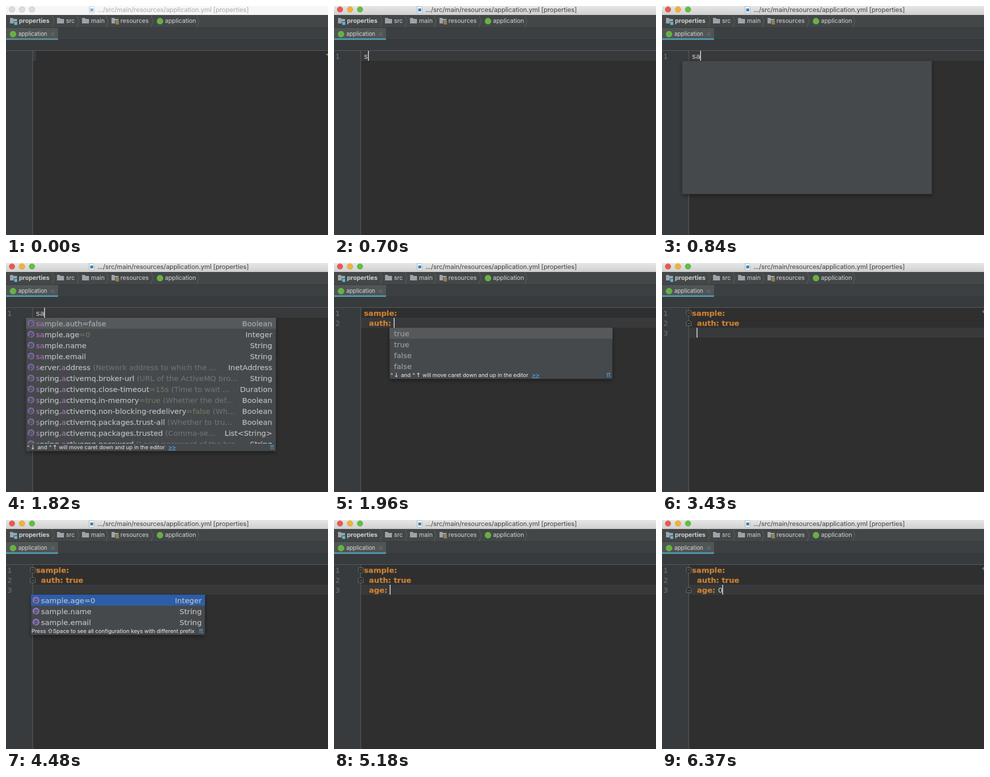
These frames come from a looping animation (644 px wide and 460 px high, 6.44 s). An HTML page:

```html
<!DOCTYPE html>
<html lang="en">
<head>
<meta charset="utf-8">
<title>Editor completion</title>
<style>
  html, body { margin: 0; width: 100%; height: 100%; overflow: hidden; background: #2f2f2f; }
  svg { display: block; width: 644px; height: 460px; }
  text, tspan { white-space: pre; fill: currentColor; stroke: currentColor; stroke-width: .25px; }
  .ui { font-family: Inter, Roboto, sans-serif; color: #c6c9cb; stroke-width: .15px; }
  .code { font: 14.88px "DejaVu Sans", sans-serif; color: #b9bbbc; }
  .key { font-weight: bold; color: #cc8134; }
  .num { color: #686c6f; }
  .hit { color: #a670b1; }
  .value { color: #687a5c; }
  .desc { color: #6c7072; }
  .faint { color: #999c9e; }
  .dim { color: #a6a8a9; }
  .hint { color: #d6d8d9; }
  .link { color: #599be4; }
</style>
</head>
<body>
<svg id="stage" viewBox="0 0 644 460"></svg>
<script>
const LOOP = 6440;

const rect = (x, y, w, h, fill, more = '') =>
  `<rect x="${x}" y="${y}" width="${w}" height="${h}" fill="${fill}" ${more}/>`;
const circle = (x, y, r, fill, more = '') =>
  `<circle cx="${x}" cy="${y}" r="${r}" fill="${fill}" ${more}/>`;
const line = (d, color, width = 1) =>
  `<path d="${d}" fill="none" stroke="${color}" stroke-width="${width}"/>`;
const text = (x, y, body, cls, more = '') =>
  `<text x="${x}" y="${y}" class="${cls}" ${more}>${body}</text>`;
const ui = (x, y, body, size, more = '') => text(x, y, body, 'ui', `font-size="${size}" ${more}`);
const hint = (x, y, body) => text(x, y, body, 'ui hint', 'font-size="10.9"');
const span = (cls, body) => `<tspan class="${cls}">${body}</tspan>`;
const group = (id, body) => `<g id="${id}">${body}</g>`;

const folder = x =>
  `<path d="M${x} 24h5.5l1.5 2h7v9h-14z" fill="#9ba4aa"/>`;
const chevron = x => line(`M${x} 19l4 11.5l-4 12`, '#5f6467');

function fold(y, dir) {
  const at = n => y + n * dir;
  return `<path d="M48.5 ${at(-5)}h10V${at(2.5)}L55.5 ${at(5.5)}h-4L48.5 ${at(2.5)}z" fill="#2f2f2f" stroke="#717476"/>`
    + line(`M51 ${at(-.5)}h5`, '#717476');
}

function titleBar(active) {
  const lights = active ? ['#ee574f', '#f3b232', '#5bc140'] : ['#dcdcdc', '#dcdcdc', '#dcdcdc'];
  const rim = 'stroke="#000" stroke-opacity=".14"';
  return rect(0, 0, 644, 18, active ? 'url(#bar)' : '#f6f6f6')
    + lights.map((c, i) => circle(12 + 20 * i, 7, 5.8, c, rim)).join('')
    + `<g opacity="${active ? 1 : .6}">`
    + '<path d="M166.5 .5h7l3 3v10.500h-10z" fill="#fcfcfc" stroke="#a3a8ac"/>'
    + rect(168.500, 5, 6, 6, '#3283bd') + '</g>'
    + ui(183, 12, '.../src/main/resources/application.yml [properties]', 12.75,
         `style="color:${active ? '#505050' : '#b2b2b2'}"`);
}

function chrome() {
  return rect(0, 18, 644, 26, '#434748') + rect(0, 43, 644, 1, '#333637')
    + folder(8) + rect(15.5, 31, 7, 7, '#434748') + rect(16.5, 32, 6, 6, '#58b8d8')
    + ui(26, 34, 'properties', 12, 'font-weight="700"') + chevron(92)
    + folder(102) + ui(120, 34, 'src', 12) + chevron(142)
    + folder(152) + ui(170, 34, 'main', 12) + chevron(200)
    + folder(211) + rect(218, 29, 9, 9, '#434748')
    + [30, 32.5, 35].map(y => rect(219, y, 7, 1.5, '#c9a452')).join('')
    + ui(229, 34, 'resources', 12) + chevron(290)
    + circle(308, 30.5, 6.5, '#67b045') + ui(318, 34, 'application', 12) + chevron(382)
    + rect(0, 44, 644, 24, '#3d4042') + rect(0, 44, 104, 24, '#505556')
    + circle(14, 56.5, 6.5, '#67b045') + ui(24.8, 60, 'application', 11.15)
    + line('M89.500 53l7 7m0 -7l-7 7', '#7d8284')
    + rect(0, 67, 644, 1, '#323536') + rect(0, 65, 104, 3, '#4f9fb1')
    + rect(0, 68, 644, 21, '#383b3d') + rect(0, 89, 644, 1, '#5c6062');
}

const badge = (x, y, fill) => circle(x, y, 7, fill)
  + text(x, y + 3.5, 'p', 'ui', 'font-size="11" text-anchor="middle" style="color:#353044"');

function popup(id, x, y, w, h, rows, selected, footer) {
  return group(id,
    rect(x, y, w, h, '#45494b', 'filter="url(#shadow)"')
    + rect(x + .5, y + .5, w - 1, h - 1, 'none', 'stroke="#3b3e40"')
    + group(id + 'Body', rect(x, y, w, 22, selected) + rows + footer));
}

const arrow = (x, y, glyph) => hint(x, y, '^')
  + text(x + 7, y, glyph, 'code hint', 'style="font-size:11.5px"');
const pi = (x, y) => text(x, y, 'π', 'code', 'text-anchor="middle" style="color:#4d9bd0;font-size:13.5px"');

function caretHint(x, y, piX) {
  return arrow(x, y, '↓') + hint(x + 21, y, 'and') + arrow(x + 44, y, '↑')
    + hint(x + 64, y, 'will move caret down and up in the editor')
    + text(x + 283, y, '&gt;&gt;', 'ui link', 'font-size="11" font-weight="600" text-decoration="underline"')
    + pi(piX, y);
}

function entry(x, y, right, body, type, purple, cls = '') {
  return badge(x - 10, y - 6, purple) + text(x, y, body, 'code ' + cls)
    + text(right, y, type, 'code ' + cls, 'text-anchor="end"');
}

function propertyRows() {
  const sample = rest => span('hit', 'sa') + 'mple.' + rest;
  const mq = (rest, value, desc) => span('hit', 's') + 'pring.' + span('hit', 'a') + 'ctivemq.' + rest
    + span('value', value) + span('desc', ` (${desc}...`);
  const rows = [
    [sample('auth=false'), 'Boolean'],
    [sample('age' + span('value', '=0')), 'Integer'],
    [sample('name'), 'String'],
    [sample('email'), 'String'],
    [span('hit', 's') + 'erver.' + span('hit', 'a') + 'ddress'
      + span('desc', ' (Network address to which the ...'), 'InetAddress'],
    [mq('broker-url', '', 'URL of the ActiveMQ bro'), 'String'],
    [mq('close-timeout', '=15s', 'Time to wait '), 'Duration'],
    [mq('in-memory', '=true', 'Whether the def'), 'Boolean'],
    [mq('non-blocking-redelivery', '=false', 'Wh'), 'Boolean'],
    [mq('packages.trust-all', '', 'Whether to tru'), 'Boolean'],
    [mq('packages.trusted', '', 'Comma-se'), 'List&lt;String&gt;'],
    [mq('password', '', 'Login password of the bro'), 'String'],
  ];
  return '<g clip-path="url(#list)">'
    + rows.map(([body, type], i) => entry(60, 127 + 22 * i, 532.5, body, type, '#75658f', i ? '' : 'dim')).join('')
    + '</g>';
}

const valueRows = ['true', 'true', 'false', 'false']
  .map((s, i) => text(120, 147 + 22 * i, s, 'code faint')).join('');
const sampleRows = [['age=0', 'Integer'], ['name', 'String'], ['email', 'String']]
  .map(([s, type], i) => entry(70, 167 + 22 * i, 391.5, 'sample.' + s, type, '#8672b2')).join('');

document.getElementById('stage').innerHTML = `<defs>
    <linearGradient id="bar" x2="0" y2="1"><stop stop-color="#e6e6e6"/><stop offset="1" stop-color="#d0d0d0"/></linearGradient>
    <filter id="shadow" x="-10%" y="-20%" width="120%" height="140%">
      <feDropShadow dx="0" dy="3" stdDeviation="4" flood-color="#000" flood-opacity=".4"/></filter>
    <clipPath id="list"><rect x="40" y="110" width="500" height="253"/></clipPath>
  </defs>`
  + rect(0, 0, 644, 460, '#2f2f2f') + rect(0, 90, 53, 370, '#383b3d')
  + group('row', rect(54, 0, 590, 20, '#38393a'))
  + rect(53, 90, 1, 370, '#5c6063')
  + chrome() + group('idle', titleBar(false) + rect(0, 65, 104, 3, '#628e99') + rect(54, 90, 6, 20, '#393d40'))
  + group('active', titleBar(true))
  + [1, 2, 3].map(n => group('num' + n, text(2.5, 86 + 20 * n, n, 'code num'))).join('')
  + group('foldStart', fold(101, 1)) + group('foldEnd', fold(0, -1))
  + [1, 2, 3].map(n => text(n > 1 ? 70 : 60, 86 + 20 * n, '', 'code', `id="line${n}"`)).join('')
  + group('ok', line('M640.500 96l2.500 2.500l3 -5', '#5fae48', 2))
  + group('busy', line('M645 94l-3.500 3.500l3.500 3.500', '#888c8e', 1.5))
  + popup('props', 40, 110, 500, 268, propertyRows(), '#56595b', caretHint(42, 374, 532))
  + popup('values', 111, 130, 446, 103, valueRows, '#56595b', caretHint(113, 229, 549))
  + popup('keys', 50, 150, 348, 81, sampleRows, '#2c5da8',
          hint(51, 227, 'Press ⇧Space to see all configuration keys with different prefix') + pi(390, 227))
  + group('caret', rect(0, 0, 1.6, 20, '#dfe1e2'));

const el = id => document.getElementById(id);
const show = (id, on) => el(id).setAttribute('visibility', on ? 'inherit' : 'hidden');
const move = (id, x, y) => el(id).setAttribute('transform', `translate(${x} ${y})`);
const fill = (id, html) => { if (el(id).dataset.body !== html) el(id).dataset.body = el(id).innerHTML = html; };
const key = s => span('key', s);

// [start, current line, caret x, line 1, line 2, line 3]
const steps = [
  [0, 1, 60, '', '', ''],
  [700, 1, 68, 's', '', ''],
  [770, 1, 76.3, 'sa', '', ''],
  [1890, 2, 119.5, key('sample:'), key('auth:'), ''],
  [2310, 2, 154.5, key('sample:'), key('auth: true'), ''],
  [3080, 3, 69.3, key('sample:'), key('auth: true'), ''],
  [4830, 3, 111.5, key('sample:'), key('auth: true'), key('age:')],
  [5670, 3, 120.5, key('sample:'), key('auth: true'), key('age: ') + '0'],
];

function render(t) {
  const within = (a, b = LOOP) => t >= a && t < b;
  const [, row, caretX, ...lines] = steps.filter(s => t >= s[0]).pop();
  lines.forEach((s, i) => fill('line' + (i + 1), s));

  show('idle', within(0, 70));
  show('active', within(70));
  show('row', within(70));
  move('row', 0, 70 + 20 * row);
  for (const n of [1, 2, 3]) show('num' + n, within(70) && row >= n);

  show('foldStart', within(2450));
  show('foldEnd', within(2450));
  move('foldEnd', 0, t < 5670 ? 121 : 141);
  show('ok', within(0, 70));
  show('busy', within(3430, 3780) || within(6300));

  show('props', within(840, 1890));
  show('propsBody', within(910, 1890));
  show('values', within(1960, 2310));
  show('keys', within(4200, 4830));
  show('caret', within(70) && !within(4060, 4550));
  move('caret', caretX, 70 + 20 * row);
}

const start = performance.now();
function tick() {
  render((performance.now() - start) % LOOP);
  requestAnimationFrame(tick);
}
tick();
</script>
</body>
</html>
```
